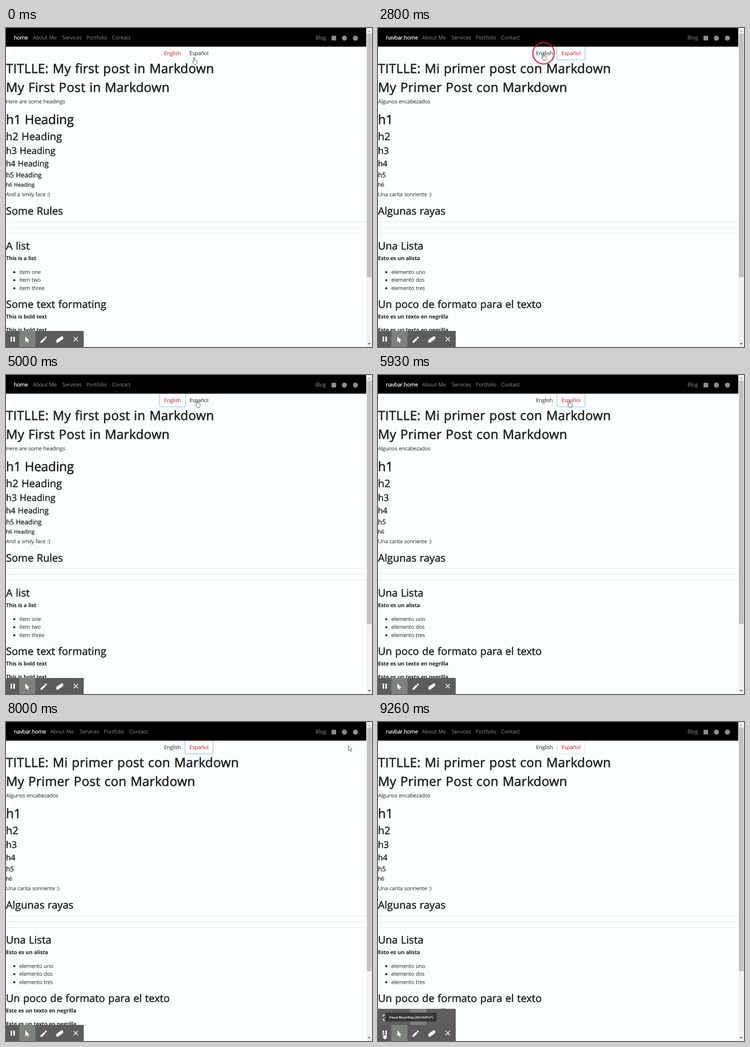
Write an HTML page that moves like this. It is 796 by 694 pixels and loops after 9330 ms.

```html
<!DOCTYPE html>
<html lang="en">
<head>
<meta charset="utf-8">
<title>Language switch</title>
<style>
html, body { margin: 0; width: 100%; height: 100%; overflow: hidden; background: #fbfffc; }
svg { display: block; width: 796px; height: 694px; }
text {
  font: 400 11.68px "Open Sans", "Noto Sans", sans-serif;
  letter-spacing: -.022em; word-spacing: .05em;
  fill: #212529; text-rendering: geometricPrecision; white-space: pre;
}
.h1, .h2, .h3, .h4, .h5, .h6 {
  letter-spacing: .004em; word-spacing: .04em;
  stroke: #212529; stroke-width: .028em; stroke-linejoin: round;
}
.h1 { font-size: 27.8px; letter-spacing: .013em; }
.h2 { font-size: 22.5px; }
.h3 { font-size: 19.9px; }
.h4 { font-size: 17.2px; }
.h5 { font-size: 14.6px; letter-spacing: -.006em; }
.h6 { letter-spacing: -.006em; }
.tight { letter-spacing: -.006em; }
.b { font-weight: 700; }
.nav { fill: #8c8c8c; }
.on { fill: #fff; stroke: #fff; stroke-width: .25px; }
.red { fill: #cc1428; }
.tip rect { fill: #333; }
.tip text { font: 500 7px Roboto, sans-serif; letter-spacing: 0; word-spacing: 0; fill: #fff; text-anchor: middle; }
.icon { fill: #fff; }
.line { fill: none; stroke: #fff; stroke-width: 1.6; }
.pointer { fill: #fff; stroke: #3a3a3a; stroke-width: .9; stroke-linejoin: round; }

#en, #es, #focusEn, #focusEs, #glow, #panel, #hand, #arrow { animation: 9.33s step-end infinite; }
#bar, #cursor, #click, #tipHide, #tipErase, #tipPause { animation: 9.33s linear infinite; }
#en { animation-name: en; }
#es { animation-name: es; }
#focusEn { animation-name: focusEn; }
#focusEs { animation-name: focusEs; }
#glow { animation-name: glow; }
#panel { animation-name: panel; }
#hand { animation-name: hand; }
#arrow { animation-name: arrow; }
#bar { animation-name: bar; }
#cursor { animation-name: cursor; }
#click { animation-name: click; }
#tipHide { animation-name: tipHide; }
#tipErase { animation-name: tipErase; }
#tipPause { animation-name: tipPause; }

@keyframes en { 0%, 32.8% { opacity: 1 } 9.22%, 62.17%, 100% { opacity: 0 } }
@keyframes es { 0%, 32.8% { opacity: 0 } 9.22%, 62.17%, 100% { opacity: 1 } }
@keyframes focusEn { 0%, 60%, 100% { opacity: 0 } 30.7% { opacity: 1 } }
@keyframes focusEs { 0%, 30.7% { opacity: 0 } 6.5%, 60%, 100% { opacity: 1 } }
@keyframes glow { 0% { opacity: 1 } 97.5%, 100% { opacity: 0 } }
@keyframes panel { 0% { opacity: 0 } 90.1%, 100% { opacity: 1 } }
@keyframes hand { 0%, 88.9%, 100% { opacity: 1 } 73.6% { opacity: 0 } }
@keyframes arrow { 0%, 88.9%, 100% { opacity: 0 } 73.6% { opacity: 1 } }
@keyframes bar {
  0%, 9.22% { transform: scaleX(0) }
  9.97% { transform: scaleX(.223) }
  12.11%, 15% { transform: scaleX(1) }
  15.01%, 32.8% { transform: scaleX(0) }
  35.6% { transform: scaleX(1) }
  35.69%, 100% { transform: scaleX(0) }
}
@keyframes cursor {
  0%, .64% { transform: translate(405px, 63px) }
  2.14%, 4.29% { transform: translate(409px, 58px) }
  6.43%, 20.69% { transform: translate(411px, 55px) }
  24.97%, 50.7% { transform: translate(356px, 54px) }
  53.59%, 72.88% { transform: translate(412px, 54px) }
  75.67%, 77.17% { transform: translate(643px, 45px) }
  82.1%, 85.74% { transform: translate(747px, 48px) }
  89.28%, 91.43% { transform: translate(148px, 674px) }
  92.8%, 94.32% { transform: translate(87px, 684px) }
  97.1%, 100% { transform: translate(9px, 674px) }
}
@keyframes click {
  0%, 6.42%, 9.22%, 29.99%, 32.8%, 59.26%, 62.17%, 100% { opacity: 0 }
  6.43%, 7.8%, 30%, 31.4%, 59.27%, 60.7% { opacity: 1 }
}
@keyframes tipHide { 0%, 90.7%, 94%, 100% { opacity: 0 } 91.43%, 92% { opacity: .95 } 92.82% { opacity: .65 } }
@keyframes tipErase { 0%, 92.3%, 93.4%, 100% { opacity: 0 } 92.82% { opacity: .35 } }
@keyframes tipPause { 0%, 97.5% { opacity: 0 } 98.6%, 100% { opacity: .95 } }
</style>
</head>
<body>
<svg viewBox="0 0 796 694">
  <rect width="796" height="694" fill="#fbfffc"/>
  <path d="M0 421.5H784M0 434H784M0 446.5H784" stroke="#e4e9e6"/>
  <g fill="#212529"><circle cx="18" cy="531.2" r="2.3"/><circle cx="18" cy="548.7" r="2.3"/><circle cx="18" cy="566.2" r="2.3"/></g>

  <g id="focusEn"><rect x="333.8" y="38" width="57" height="31.2" rx="3" fill="#fdfffe" stroke="#badaf7" stroke-width="2.2"/></g>
  <g id="focusEs">
    <rect x="389.5" y="38" width="60.5" height="31.2" rx="3" fill="#fdfffe" stroke="#cfe3f5"/>
    <rect id="glow" x="389.2" y="38" width="61" height="31.2" rx="3" fill="none" stroke="#badaf7" stroke-width="2.2"/>
  </g>

  <rect width="783.5" height="40.6"/>
  <g fill="#8c8c8c">
    <rect x="708" y="17" width="10" height="10"/>
    <circle cx="736" cy="22" r="5.5"/>
    <circle cx="760" cy="22" r="5.5"/>
  </g>
  <text class="nav" x="673" y="25">Blog</text>
  <g id="en"></g>
  <g id="es"></g>
  <rect id="bar" width="784" height="1.6" fill="#fff"/>

  <rect x="784" width="12" height="694" fill="#f1f2f1"/>
  <rect x="785" y="12" width="10" height="530" fill="#c1c1c1"/>
  <path d="M787 8.5h6l-3-3.5z" fill="#a3a3a3"/>
  <path d="M787 685.5h6l-3 3.5z" fill="#505050"/>

  <g id="panel">
    <rect y="624" width="169" height="36" fill="#5e605e"/>
    <rect x="70" y="624" width="35" height="35" fill="#7d827c"/>
    <path class="line" d="M11.5 641v-3.5H15M20 637.5h3.5V641M23.5 645.5v3.5H20M15 649h-3.5v-3.5"/>
    <circle class="icon" cx="17.5" cy="643.3" r="2"/>
    <circle class="line" cx="52.5" cy="643" r="6.6"/>
    <path class="icon" d="M50 638.5v9l2.3-2 1.6 3 1.5-.8-1.5-2.9h3z"/>
    <path class="line" d="M48 638.5l9 9"/>
    <circle class="line" cx="86" cy="642" r="6.3" style="stroke-width:2"/>
    <path class="icon" d="M84.5 639v11l2.6-2.3 1.9 4 1.8-.8-1.9-3.9h3.6z"/>
  </g>
  <rect y="659" width="169" height="35" fill="#5b5d5b"/>
  <rect x="29" y="659" width="35" height="35" fill="#7d827c"/>
  <g class="icon">
    <path d="M10 671.5h3.3v11H10zM16 671.5h3.3v11H16z"/>
    <path d="M42 671v12.5l3-2.7 2 4.4 2-.9-2-4.3h4z"/>
    <path d="M75 685v-3l8-8 3 3-8 8zM84 673l1.6-1.6q.8-.6 1.5 0l1.4 1.4q.6.8 0 1.5L87 676z"/>
    <path d="M109.5 678.5l11-7.5h3.8v5.5l-11 8h-3.8z"/>
  </g>
  <path class="line" d="M147 672l9.5 9.5M156.5 672l-9.5 9.5"/>

  <g id="tipErase" class="tip"><rect x="104" y="638" width="26" height="9" rx="2"/><text x="117" y="644.2" style="font-size:4.5px">Eraser</text></g>
  <g id="tipHide" class="tip"><rect x="117" y="632.5" width="71.5" height="19" rx="3"/><text x="152.5" y="644.5">Hide Tools (Alt+T)</text></g>
  <g id="tipPause" class="tip"><rect x="16" y="632.5" width="111.5" height="19" rx="3"/><text x="72" y="644.5">Pause Recording (Alt+Shift+P)</text></g>

  <g id="cursor">
    <circle id="click" cx="4" cy="1" r="23.3" fill="none" stroke="#de143c" stroke-opacity=".78" stroke-width="3"/>
    <path id="hand" class="pointer" d="M3 1.5Q4.1 0 5.2 1.5V6.8l3.9.9q1.7.4 1.5 2l-.7 4.2q-.3 2.6-2 2.6H5q-1 0-1.7-1.2L.6 11.2q-.4-1.6 1.1-1.4l1.3 1z"/>
    <path id="arrow" class="pointer" d="M.5.5v11.3l2.6-2.3 1.8 4 1.9-.8-1.8-3.9h3.4z"/>
  </g>
</svg>
<script>
const $ = id => document.getElementById(id);

function put(group, x, y, cls, str) {
  const node = document.createElementNS(group.namespaceURI, 'text');
  node.setAttribute('x', x);
  node.setAttribute('y', y);
  node.setAttribute('class', cls);
  node.textContent = str;
  group.append(node);
}

// baseline, class, English, Spanish, left edge
const rows = [
  [98, 'h1', 'TITLLE: My first post in Markdown', 'TITLLE: Mi primer post con Markdown'],
  [138.5, 'h1', 'My First Post in Markdown', 'My Primer Post con Markdown'],
  [163.5, '', 'Here are some headings', 'Algunos encabezados'],
  [208.5, 'h1 tight', 'h1 Heading', 'h1'],
  [243.5, 'h2', 'h2 Heading', 'h2'],
  [274, 'h3', 'h3 Heading', 'h3'],
  [301, 'h4', 'h4 Heading', 'h4'],
  [324.5, 'h5', 'h5 Heading', 'h5'],
  [345, 'h6', 'h6 Heading', 'h6'],
  [366, '', 'And a smily face :)', 'Una carita sonriente :)'],
  [405.5, 'h2', 'Some Rules', 'Algunas rayas'],
  [482, 'h2', 'A list', 'Una Lista'],
  [505, 'b', 'This is a list', 'Esto es un alista'],
  [534.5, '', 'item one', 'elemento uno', 29],
  [552, '', 'item two', 'elemento dos', 29],
  [569.5, '', 'item three', 'elemento tres', 29],
  [609, 'h2', 'Some text formating', 'Un poco de formato para el texto'],
  [632, 'b', 'This is bold text', 'Este es un texto en negrilla'],
  [661, 'b', 'This is bold text', 'Este es un texto en negrilla']
];
const menu = [[58.5, 'About Me'], [122.5, 'Services'], [175, 'Portfolio'], [230.5, 'Contact']];

['en', 'es'].forEach((lang, i) => {
  const g = $(lang);
  put(g, 17, 25, 'on', ['home', 'navbar.home'][i]);
  for (const [x, label] of menu) put(g, x + i * 37.5, 25, 'nav', label);
  put(g, 343.5, 59, i ? '' : 'red', 'English');
  put(g, 399, 59, i ? 'red' : '', 'Español');
  for (const [y, cls, en, es, x = 0] of rows) put(g, x, y, cls, i ? es : en);
});
</script>
</body>
</html>
```
